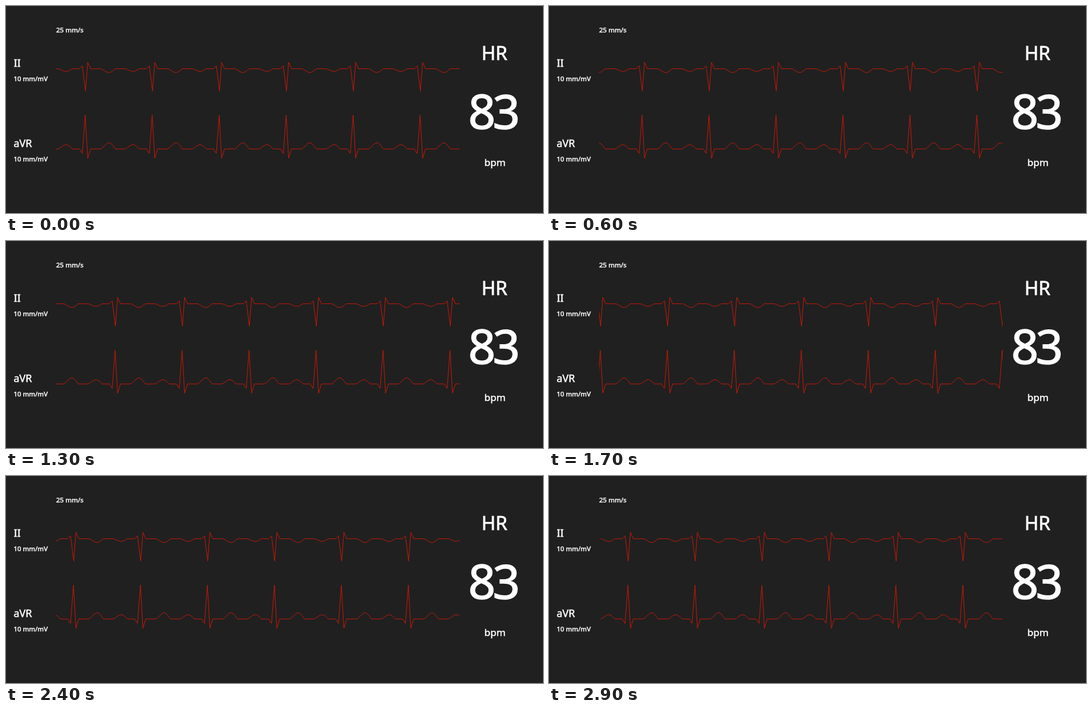
Write an HTML page that moves like this. It is 934 px wide and 361 px high and loops after 3 s.

```html
<!DOCTYPE html>
<html lang="en">
<head>
<meta charset="utf-8">
<title>ECG monitor</title>
<style>
  html, body { margin: 0; width: 100%; height: 100%; overflow: hidden; background: #202020; }
  svg { display: block; width: 934px; height: 361px; }
  text { font-family: "Noto Sans", "Open Sans", sans-serif; fill: #fff; stroke: #fff; stroke-width: .5px; }
  .small { font-size: 11.5px; }
  .lead { font-size: 18px; }
  .trace { fill: none; stroke: #cc1805; stroke-width: 1; stroke-linejoin: bevel; }
</style>
</head>
<body>
<svg viewBox="0 0 934 361">
  <defs>
    <clipPath id="screen"><rect x="87" y="90" width="702" height="185"/></clipPath>
  </defs>
  <rect width="934" height="361" fill="#202020"/>
  <text class="small" x="87.3" y="45.6">25 mm/s</text>
  <text class="lead" x="13.4" y="106">II</text>
  <text class="small" x="13.2" y="130.6">10 mm/mV</text>
  <text class="lead" x="13.2" y="246.2">aVR</text>
  <text class="small" x="13.2" y="270.6">10 mm/mV</text>
  <g text-anchor="middle">
    <text x="849.6" y="94" font-size="33" style="stroke-width:.8px">HR</text>
    <text x="846.5" y="214" font-size="83" letter-spacing="-5" style="stroke-width:1.6px">83</text>
    <text x="850.5" y="279" font-size="17">bpm</text>
  </g>
  <g clip-path="url(#screen)">
    <g id="scroll">
      <path class="trace" id="leadII"/>
      <path class="trace" id="leadAVR"/>
    </g>
  </g>
</svg>
<script>
  const BEAT = 116.5, BEATS = 7, FIRST = 21.3;
  const STEP_MS = 100, STEPS = 30, STEP_PX = 4;

  // A rounded wave, peaking a little late, between two offsets from the main spike
  function hump(from, to, height) {
    const pts = [];
    for (let i = 0; i <= 14; i++) {
      const u = i / 14;
      const lift = Math.sin(Math.PI * Math.pow(u, 1.2));
      pts.push([from + (to - from) * u, height * Math.pow(Math.max(0, lift), 1.2)]);
    }
    return pts;
  }

  // Heights are in pixels, positive downwards from the baseline
  function beat(p, q, r, s, t, shift) {
    return [
      ...hump(-47.5, -22.3, p),
      [-10, 0], [-5, q], [shift, r], [4.3, s], [9.3, 0],
      ...hump(26.8, 52.5, t),
      [BEAT - 47.5, 0]
    ];
  }

  function drawLead(id, base, shape) {
    const pts = [];
    for (let i = 0; i < BEATS; i++) {
      for (const [x, y] of shape) {
        pts.push((FIRST + i * BEAT + x).toFixed(2) + "," + (base + y).toFixed(2));
      }
    }
    document.getElementById(id).setAttribute("d", "M" + pts.join("L"));
  }

  drawLead("leadII", 109.4, beat(4.6, -5, 39, -11.2, 6.6, 0.5));
  drawLead("leadAVR", 249.3, beat(-7.4, 7.8, -59, 16.2, -10.7, 0));

  const scroll = document.getElementById("scroll");
  const start = performance.now();

  function render(ms) {
    const step = Math.floor(ms / STEP_MS) % STEPS;
    scroll.setAttribute("transform", `translate(${step * STEP_PX} 0)`);
  }

  function tick() {
    render(performance.now() - start);
    requestAnimationFrame(tick);
  }

  render(0);
  requestAnimationFrame(tick);
</script>
</body>
</html>
```
